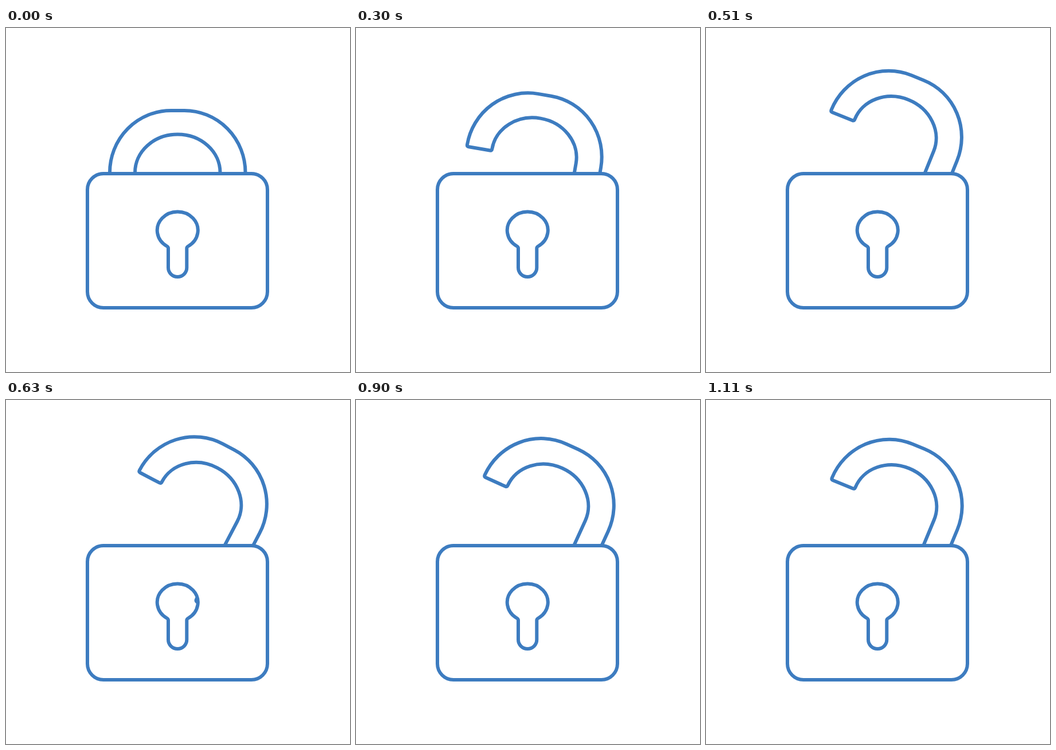
An HTML page for the animation above (2250 ms loop, 600x600 px).

```html
<!DOCTYPE html>
<html lang="en">
<head>
<meta charset="utf-8">
<title>Padlock opening</title>
<style>
  html, body { margin: 0; height: 100%; overflow: hidden; background: #fff; }
  svg { display: block; width: 100%; height: 100%; }
  path { fill: none; stroke: #3d7cc0; stroke-width: 6; stroke-linejoin: round; }
  #body { fill: #fff; fill-rule: evenodd; }
</style>
</head>
<body>
<svg viewBox="0 0 600 600">
  <path id="shackle" d="M181 252A107 108 0 0 1 288 144H311A106.5 108 0 0 1 417.5 252
    V405q0 4 -4 4H377.5q-4 0 -4 -4V252A74.2 66.5 0 0 0 225 252
    q0 3.5 -3.5 3.5H184.5q-3.5 0 -3.5 -3.5Z"/>
  <!-- The keyhole is a real hole: the shackle's foot can show through it. -->
  <path id="body" d="M170 254H428A28 28 0 0 1 456 282V460A28 28 0 0 1 428 488
    H170A28 28 0 0 1 142 460V282A28 28 0 0 1 170 254Z
    M283 418V384Q283 382 280.5 380.5A35.5 32.5 0 1 1 318 380.5
    Q315.3 382 315.3 384V418A16.15 16 0 0 1 283 418Z"/>
</svg>
<script>
  const LOOP = 2250, STEP = 30;
  const shackle = document.getElementById('shackle');

  // time (ms), angle (degrees), lift (px)
  const keys = [
    [0, 0, 0], [180, 2.9, 1.5], [300, 9.7, 13.5], [510, 22, 33.5],
    [630, 27.7, 37], [900, 24.5, 38], [1110, 22.5, 39]
  ];

  function slope(i, k) {
    const a = keys[i - 1], b = keys[i + 1];
    return a && b ? (b[k] - a[k]) / (b[0] - a[0]) : 0;
  }

  // Smooth cubic through the keys, at rest at both ends.
  function valueAt(t, k) {
    const i = keys.findIndex(key => key[0] > t) - 1;
    if (i < 0) return keys[keys.length - 1][k];
    const a = keys[i], b = keys[i + 1], d = b[0] - a[0];
    const u = (t - a[0]) / d, v = 1 - u;
    return a[k] * v * v * (1 + 2 * u) + b[k] * u * u * (3 - 2 * u)
      + d * u * v * (slope(i, k) * v - slope(i + 1, k) * u);
  }

  function draw(now) {
    const t = Math.floor(now % LOOP / STEP) * STEP;
    shackle.setAttribute('transform',
      `translate(0 ${-valueAt(t, 2)}) rotate(${valueAt(t, 1)} 395 311)`);
  }

  const start = performance.now();
  function tick() {
    draw(performance.now() - start);
    requestAnimationFrame(tick);
  }
  tick();
</script>
</body>
</html>
```
